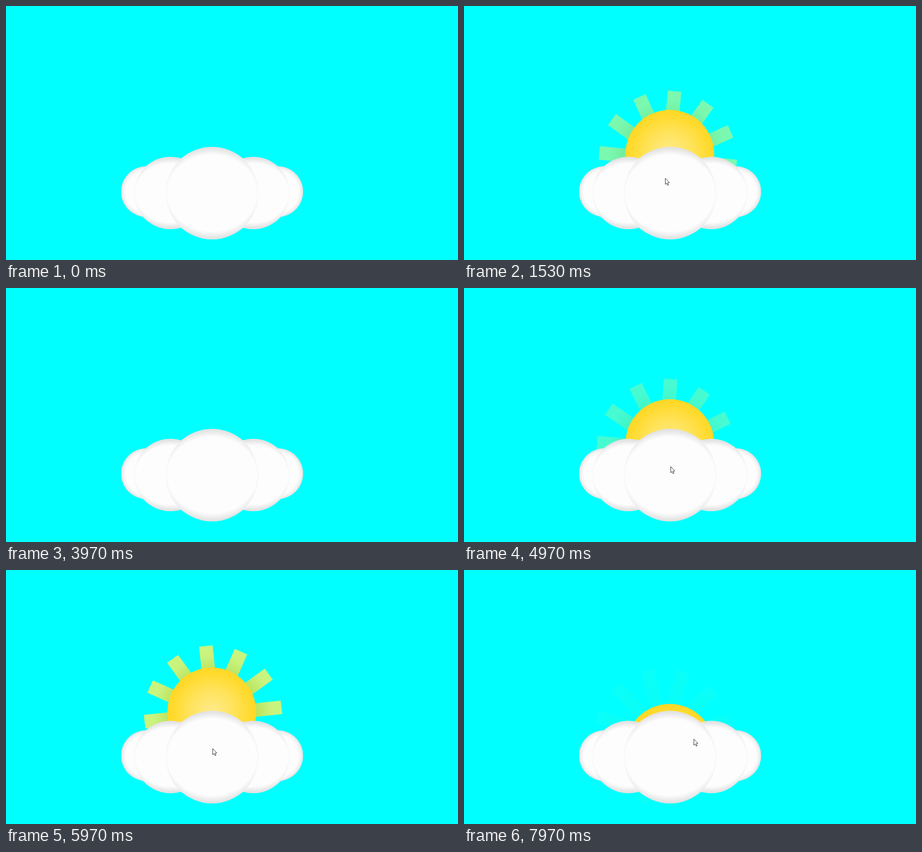
Write an HTML page with a canvas that moves like this. It is 998 px wide and 561 px high and loops after 8000 ms.

```html
<!DOCTYPE html>
<html lang="en">
<head>
<meta charset="utf-8">
<title>Sun behind a cloud</title>
<style>
  html, body { margin: 0; width: 100%; height: 100%; overflow: hidden; background: #0ff; }
  canvas { display: block; width: 998px; height: 561px; }
</style>
</head>
<body>
<canvas id="stage" width="998" height="561"></canvas>
<script>
const ctx = document.getElementById('stage').getContext('2d');
const LOOP = 8000, RISE = 2000, TAU = Math.PI * 2;

// Spans during which the pointer is over the cloud: [enter, leave]
const hovers = [[415, 2800], [4155, 6860], [7665, 8000]];

// Pointer paths as [time, x, y]; it is off stage between them
const paths = [
  [[200, 915, 279], [410, 650, 375], [800, 444, 380], [2530, 444, 380], [2800, 655, 430], [3220, 998, 500]],
  [[4040, 998, 186], [4155, 650, 372], [4500, 456, 394], [6250, 456, 394], [6830, 653, 435], [7150, 998, 462]],
  [[7520, 874, 267], [7665, 640, 350], [7940, 507, 373], [8000, 507, 373]]
];

const mix = (a, b, p) => a + (b - a) * p;

function bezier(x1, y1, x2, y2) {
  const at = (a, b, s) => 3 * a * s * (1 - s) ** 2 + 3 * b * s * s * (1 - s) + s ** 3;
  return x => {
    if (x <= 0) return 0;
    if (x >= 1) return 1;
    let lo = 0, hi = 1;
    for (let i = 0; i < 24; i++) {
      const mid = (lo + hi) / 2;
      if (at(x1, x2, mid) < x) lo = mid; else hi = mid;
    }
    return at(y1, y2, lo);
  };
}
const ease = bezier(0.25, 0.1, 0.25, 1);
const easeInOut = bezier(0.42, 0, 0.58, 1);

function radial(x, y, r, stops) {
  const g = ctx.createRadialGradient(x, y, 0, x, y, r);
  for (const [at, color] of stops) g.addColorStop(at, color);
  return g;
}

function disc(x, y, r, fill) {
  ctx.beginPath();
  ctx.arc(x, y, r, 0, TAU);
  ctx.fillStyle = fill;
  ctx.fill();
}

function drawRays(p) {
  ctx.save();
  ctx.globalAlpha = 0.8 * p;
  ctx.translate(mix(439, 457.4, p), mix(371, 318.3, p));
  ctx.rotate(p * TAU);
  ctx.fillStyle = radial(0, 0, 152, [[0, '#eedc36'], [0.64, '#eedc36'], [0.86, '#fff05a'], [1, '#fff25c']]);
  for (let i = 0; i < 12; i++) {
    // Start outside the hub so that bars do not overlap
    ctx.fillRect(58, -15, 94, 30);
    ctx.rotate(TAU / 12);
  }
  ctx.restore();
}

function drawSun(p) {
  const x = 454.5, y = mix(413, 313, p);
  disc(x, y, 98, radial(x, y, 98, [[0, '#ffeb8c'], [0.5, '#ffe35c'], [0.85, '#ffdb30'], [1, '#ffd825']]));
}

// A puff is a grey disc with a soft white oval that leaves crescents above and below
function puff(x, y, r, rx, ry) {
  disc(x, y, r, '#e3e3e3');
  ctx.save();
  ctx.translate(x, y);
  ctx.scale(rx, ry);
  disc(0, 0, 1.08, radial(0, 0, 1.08, [[0, '#fdfdfd'], [0.85, '#fdfdfd'], [1, 'rgba(253,253,253,0)']]));
  ctx.restore();
}

function drawCloud() {
  for (const x of [310, 600]) {
    disc(x, 410, 56, radial(x, 410, 56, [[0, '#fdfdfd'], [0.8, '#fdfdfd'], [0.91, '#f3f3f3'], [1, '#e2e2e2']]));
  }
  for (const x of [363, 546]) puff(x, 413, 80, 84, 71);
  puff(455, 413.3, 102.3, 107, 92);
}

function drawPointer(t) {
  const path = paths.find(p => t >= p[0][0] && t <= p[p.length - 1][0]);
  if (!path) return;
  const i = path.findIndex((k, n) => n && t <= k[0]);
  const [t0, x0, y0] = path[i - 1], [t1, x1, y1] = path[i];
  const p = (t - t0) / (t1 - t0);
  ctx.save();
  ctx.translate(mix(x0, x1, p) + 0.5, mix(y0, y1, p) + 0.5);
  ctx.beginPath();
  [[0, 0], [0, 13.5], [3, 10.8], [5.2, 15.6], [7.2, 14.7], [5.1, 10], [9, 9.5]]
    .forEach(([x, y]) => ctx.lineTo(x, y));
  ctx.closePath();
  ctx.fillStyle = '#fff';
  ctx.fill();
  ctx.strokeStyle = '#222';
  ctx.lineWidth = 1;
  ctx.stroke();
  ctx.restore();
}

function draw(t) {
  ctx.fillStyle = '#0ff';
  ctx.fillRect(0, 0, 998, 561);
  const hover = hovers.find(([from, to]) => t >= from && t < to);
  if (hover) {
    const x = (t - hover[0]) / RISE;
    drawRays(easeInOut(x));
    drawSun(ease(x));
  }
  drawCloud();
  drawPointer(t);
}

const start = performance.now();
function tick() {
  draw((performance.now() - start) % LOOP);
  requestAnimationFrame(tick);
}
tick();
</script>
</body>
</html>
```
